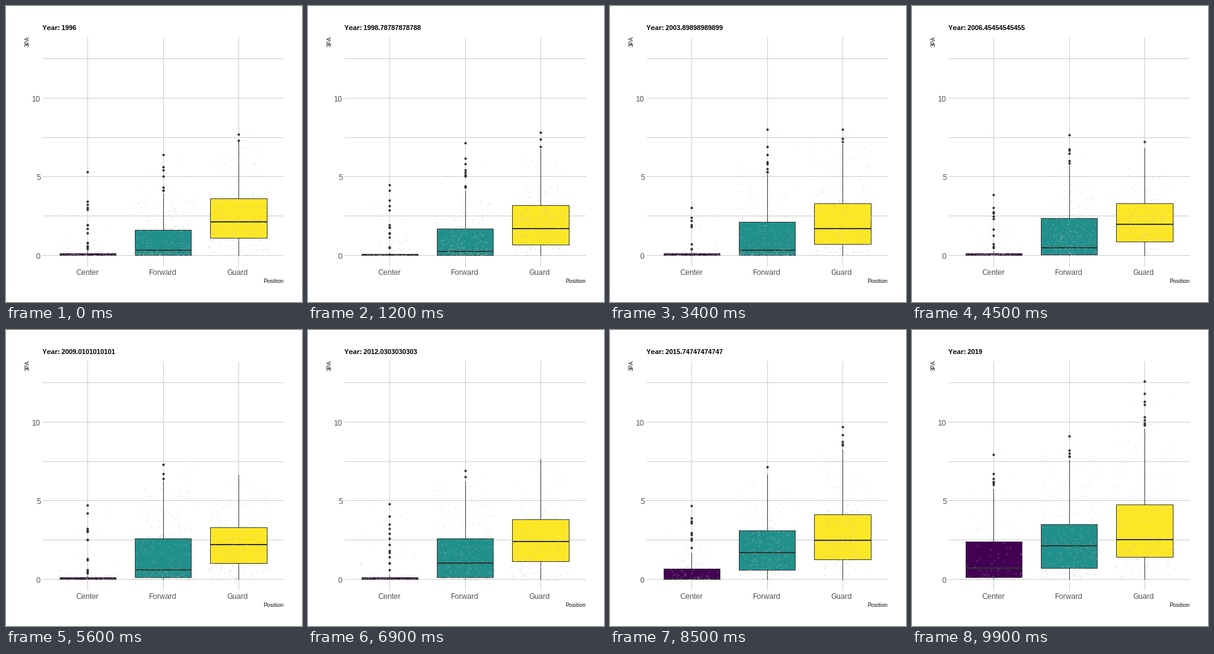
Animation of 480 by 480 pixels, one loop 10000 ms. Source, as a matplotlib script:

```python
import numpy as np
import matplotlib.pyplot as plt
from matplotlib.animation import FuncAnimation
from matplotlib.patches import Rectangle

SIZE, DPI, FRAMES = 480, 72, 100
Y0, UNIT = 403.9, 25.5            # height of zero, pixels per attempt
SPACING, HALF_BOX = 122.2, 45.8
DARK, GRID, LABEL = "#333333", "#cccccc", "#4d4d4d"

rng = np.random.default_rng(23)
year_frames = np.round(np.linspace(0, FRAMES - 1, 24)).astype(int).tolist()


def row(value):
    return Y0 - UNIT * np.asarray(value)


def curve(*points):
    """Straight segments through (frame, value) points, flat outside."""
    frames, values = zip(*points)
    return lambda frame: np.interp(frame, frames, values)


def resize(values, n):
    picks = np.round(np.linspace(0, len(values) - 1, n)).astype(int)
    return values[picks]


def blend(a, b, t):
    if t == 0 or len(a) == 0 or len(b) == 0:
        return a
    n = max(len(a), len(b))
    return resize(a, n) * (1 - t) + resize(b, n) * t


def years_around(frame):
    """Years before and after, and the share of the way between them."""
    i = np.searchsorted(year_frames, frame, "right") - 1
    j = min(i + 1, len(year_frames) - 1)
    t = (frame - year_frames[i]) / max(year_frames[j] - year_frames[i], 1)
    return i, j, t


class Group:
    def __init__(self, ax, x, fill, count, low, mid, high, peak):
        self.x, self.count = x, count
        self.low, self.mid, self.high, self.peak = low, mid, high, peak
        self.outliers = [self.year_outliers(f) for f in year_frames]
        self.clouds = [self.year_cloud(f, out)
                       for f, out in zip(year_frames, self.outliers)]

        self.whiskers = [ax.plot([], [], color=DARK, lw=1, zorder=2)[0]
                         for _ in range(2)]
        self.box = ax.add_patch(Rectangle((x - HALF_BOX, Y0), 2 * HALF_BOX, 0,
                                          fc=fill, ec=DARK, lw=1, zorder=3))
        self.median, = ax.plot([], [], color=DARK, lw=2, zorder=4,
                               solid_capstyle="butt")
        self.marks, = ax.plot([], [], "o", color=DARK, ms=4, mew=0, zorder=4)
        self.dots = ax.scatter([], [], s=3.6, c="#bebebe", alpha=.42, lw=0,
                               zorder=5)

    def summary(self, frame):
        q1, med, q3 = self.low(frame), self.mid(frame), self.high(frame)
        top = .98 * (q3 + 1.5 * (q3 - q1))
        return q1, med, q3, top

    def year_outliers(self, frame):
        """Values above the whisker, crowded near it, up to the peak."""
        top, peak = self.summary(frame)[3] + .1, self.peak(frame)
        if peak <= top:
            return np.array([])
        u = np.sort(rng.random(int(np.ceil(2.8 * (peak - top)))))[::-1]
        u[0] = 1
        return np.round(top + (peak - top) * u ** 1.5, 1)

    def year_cloud(self, frame, out):
        q1, med, q3, top = self.summary(frame)
        u = rng.random(self.count)
        y = np.interp(u, [0, .25, .5, .75], [0, q1, med, q3])
        tail = np.clip((u - .75) * 4, 0, 1)
        y = np.round(y + (top - q3) * tail ** 1.6, 1)
        y[:len(out)] = out
        rng.shuffle(y)
        x = self.x + SPACING * rng.uniform(-.4, .4, self.count)
        y = y + rng.uniform(-.04, .04, self.count)
        return np.column_stack([x, row(y)])

    def draw(self, frame):
        q1, med, q3, top = self.summary(frame)
        for line, ends in zip(self.whiskers, ((0, q1), (q3, top))):
            line.set_data([self.x] * 2, row(ends))
        self.box.set_y(row(q3))
        self.box.set_height(UNIT * (q3 - q1))
        self.median.set_data([self.x - HALF_BOX, self.x + HALF_BOX],
                             [row(med)] * 2)
        i, j, t = years_around(frame)
        out = blend(self.outliers[i], self.outliers[j], t)
        self.marks.set_data([self.x] * len(out), row(out))
        self.dots.set_offsets(blend(self.clouds[i], self.clouds[j], t))


plt.rcParams.update({"font.family": "Liberation Sans",
                     "text.hinting": "native", "text.hinting_factor": 1})
fig = plt.figure(figsize=(SIZE / DPI, SIZE / DPI), dpi=DPI, facecolor="white")
ax = fig.add_axes([0, 0, 1, 1])
ax.set(xlim=(0, SIZE), ylim=(SIZE, 0), autoscale_on=False)
ax.axis("off")

for v in np.arange(0, 13, 2.5):
    ax.plot([59, 450], [row(v)] * 2, color=GRID, lw=1, zorder=1,
            solid_capstyle="butt")
for v in (0, 5, 10):
    ax.text(56, row(v) + 6, str(v), size=12, color=LABEL, ha="right")

title = ax.text(59, 39, "", size=11, weight="bold", color="black")
ax.text(450, 449, "Position", size=9, color="black", ha="right")
ax.text(38, 49, "3PA", size=9, color="black", rotation=90,
        rotation_mode="anchor", ha="right", va="baseline")

centers = [132.3 + SPACING * i for i in range(3)]
for x, name in zip(centers, ("Center", "Forward", "Guard")):
    ax.plot([x, x], [50, 422], color=GRID, lw=1, zorder=1,
            solid_capstyle="butt")
    ax.text(x - .8, 436, name, size=12, color=LABEL, ha="center")

groups = [
    Group(ax, centers[0], "#440154", 80,
          low=curve((85, 0), (99, .1)),
          mid=curve((85, 0), (99, .7)),
          high=curve((0, .1), (24, .02), (34, .1), (70, .1), (85, .68),
                     (99, 2.4)),
          peak=curve((0, 5.3), (34, 3), (60, 5), (85, 4.5), (99, 7.9))),
    Group(ax, centers[1], "#21908c", 210,
          low=curve((34, 0), (56, .1), (69, .1), (85, .6), (99, .7)),
          mid=curve((0, .3), (24, .2), (56, .6), (69, 1), (85, 1.7),
                    (99, 2.1)),
          high=curve((0, 1.6), (24, 1.77), (34, 2.1), (56, 2.6), (69, 2.6),
                     (99, 3.5)),
          peak=curve((0, 6.4), (24, 7.8), (34, 8), (69, 6.9), (85, 7),
                     (99, 9.1))),
    Group(ax, centers[2], "#fde725", 200,
          low=curve((0, 1.1), (4, .65), (34, .7), (56, 1), (99, 1.4)),
          mid=curve((0, 2.1), (4, 1.7), (34, 1.7), (56, 2.2), (69, 2.4),
                    (99, 2.5)),
          high=curve((0, 3.6), (4, 3.1), (34, 3.3), (56, 3.3), (69, 3.8),
                     (85, 4.12), (99, 4.75)),
          peak=curve((0, 7.7), (34, 8), (56, 6), (72, 7.5), (85, 9.55),
                     (95, 13.2), (99, 12.6))),
]


def update(frame):
    title.set_text(f"Year: {1996 + 23 * frame / (FRAMES - 1):.15g}")
    for group in groups:
        group.draw(frame)


anim = FuncAnimation(fig, update, frames=FRAMES, interval=100, repeat=True,
                     repeat_delay=0, init_func=lambda: update(0))
plt.show()
```
